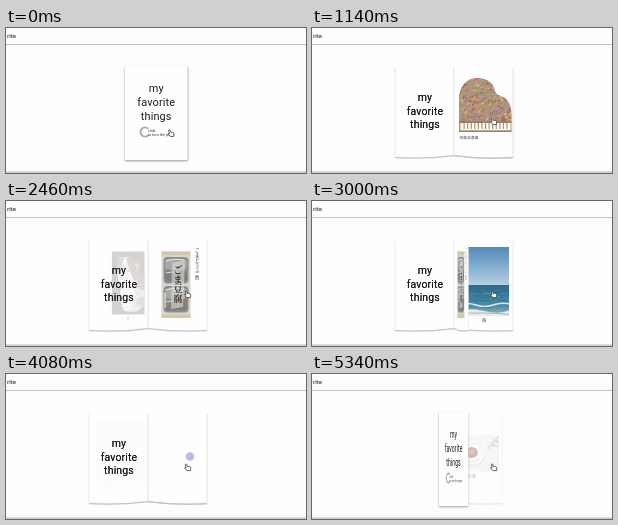
These frames come from a looping animation (300 px wide and 145 px high, 5.4 s). An HTML page with a canvas:

```html
<!DOCTYPE html>
<html lang="ja">
<head>
<meta charset="utf-8">
<title>my favorite things</title>
<style>
html, body { margin: 0; width: 100%; height: 100%; overflow: hidden; background: #fdfdfd; }
canvas { display: block; width: 300px; height: 145px; }
</style>
</head>
<body>
<canvas id="stage"></canvas>
<script>
const LOOP = 5400, STEP = 60;
const OPEN = 240, OPEN_MS = 900, FLIP = 1095, GAP = 740, FLIP_MS = 950, CLOSE = 4765;
const SPINE = 142, PAGE = 59, TOP = 40;
const JP = '"Noto Sans CJK JP", "Noto Sans CJK", sans-serif';
const SERIF = '"Noto Serif CJK JP", "Noto Sans CJK JP", "Noto Sans CJK", serif';

const canvas = document.getElementById('stage');
const g = canvas.getContext('2d');
const dpr = window.devicePixelRatio || 1;
canvas.width = 300 * dpr;
canvas.height = 145 * dpr;
const layer = document.createElement('canvas');
layer.width = canvas.width;
layer.height = canvas.height;

const clamp = v => Math.max(0, Math.min(1, v));
const ease = v => { v = clamp(v); return v * v * (3 - 2 * v); };

function random(seed) {
  return () => (seed = (seed * 16807) % 2147483647) / 2147483647;
}
function rect(x, y, w, h, fill) {
  g.fillStyle = fill;
  g.fillRect(x, y, w, h);
}
function round(x, y, w, h, r, fill) {
  g.fillStyle = fill;
  g.beginPath();
  g.roundRect(x, y, w, h, r);
  g.fill();
}
function oval(x, y, rx, ry, fill, turn = 0) {
  g.fillStyle = fill;
  g.beginPath();
  g.ellipse(x, y, rx, ry, turn, 0, 7);
  g.fill();
}
function shape(d, fill) {
  g.fillStyle = fill;
  g.fill(new Path2D(d));
}
function line(d, color, width) {
  g.strokeStyle = color;
  g.lineWidth = width;
  g.stroke(new Path2D(d));
}
function label(text, x, y, font, color = '#333', align = 'center') {
  g.font = font;
  g.fillStyle = color;
  g.textAlign = align;
  g.fillText(text, x, y);
}
function column(text, x, y, pitch, font, color) {
  [...text].forEach((c, i) => label(c, x, y + i * pitch, font, color));
}
function vertical(stops, y0, y1) {
  const grad = g.createLinearGradient(0, y0, 0, y1);
  stops.forEach((c, i) => grad.addColorStop(i / (stops.length - 1), c));
  return grad;
}
function group(draw) {
  g.save();
  draw();
  g.restore();
}
function clipBox(x, y, w, h) {
  g.beginPath();
  g.rect(x, y, w, h);
  g.clip();
}

// Page pictures: x is measured from the spine.
function piano() {
  group(() => {
    g.clip(new Path2D('M5 104V72C5 59 12 50 23 50C34 50 40 56 41 63C42 68 48 67 52 71C57 76 58 83 57.5 94V104Z'));
    rect(4, 49, 54, 56, '#b09577');
    const rnd = random(77);
    const paints = ['#d0b24a', '#b0607e', '#7f9f5e', '#cf8aa0', '#8a78b0', '#e2c988', '#b5533f', '#7396a0'];
    g.lineCap = 'round';
    for (let i = 0; i < 380; i++) {
      const x = 4 + rnd() * 54, y = 49 + rnd() * 46;
      const a = rnd() * 2 - 1.4, n = 1 + rnd() * 3;
      g.globalAlpha = .75;
      line(`M${x} ${y}l${Math.cos(a) * n} ${Math.sin(a) * n}`, paints[Math.floor(rnd() * 8)], 1.2);
    }
    g.globalAlpha = 1;
    rect(5, 93.5, 53, 1, '#8a6a50');
    rect(6.5, 95, 50, 7.5, '#fbfaf7');
    for (let i = 1; i < 14; i++) rect(6 + i * 3.57, 95, 1.1, 6, '#a58a70');
    rect(5, 102.5, 53, 1.5, '#a08468');
  });
  label('印象派音楽', 5.5, 110.7, '3.8px ' + JP, '#333', 'left');
}

function cat() {
  group(() => {
    clipBox(5, 50.5, 50, 63);
    rect(5, 50, 50, 64, '#292c2a');
    const rnd = random(19);
    for (let i = 0; i < 45; i++)
      oval(5 + rnd() * 50, 50 + rnd() * 64, 1 + rnd() * 2, .6, i % 2 ? '#38423a' : '#342f32', rnd() * 3);
    shape('M5 76C12 68 22 68 30 76L41 86C44 95 41 105 36 110L24 111C14 111 8 107 5 101Z', '#b9b2ae');
    shape('M5 75C11 69 19 70 22 77C20 85 13 90 5 89Z', '#5d4c45');
    shape('M5 97C11 93 17 97 18 103C14 107 8 105 5 103Z', '#7b6d68');
    shape('M23 84C32 86 39 85 42 89C43 98 40 105 34 110L25 108C20 100 20 91 23 84Z', '#dcd7d4');
    shape('M14 74L12 60L22 59C28 55 35 55 39 58L44 54C47 61 47 72 45 79C42 86 34 89 27 87C20 85 15 80 14 74Z', '#d9d2cd');
    shape('M14 75L12 60L22 59C27 56 32 56 33 58L28 69L21 80C17 80 15 78 14 75Z', '#5b463c');
    shape('M37 57L44 54C47 60 47 67 46 73L40 68Z', '#6b5346');
    shape('M14 63L20 63L16 70Z', '#a07c72');
    oval(30, 70, 1.7, 1, '#4c4a3a', .3);
    oval(42, 69, 1.4, .9, '#4c4a3a', -.3);
    oval(39, 76, 1.6, 1.1, '#c48e88');
    line('M39 77c-1 3-4 3-6 2M39 77c1 3 3 2 4 1', '#8b7771', .5);
  });
  label('猫', 30, 119.2, '4px ' + JP);
}

function tofu() {
  rect(13.5, 50.5, 29, 66.5, '#d9d5cd');
  rect(13.5, 50.5, 29, 3.5, '#d3c8ae');
  rect(13.5, 113.5, 29, 3.5, '#d3c8ae');
  for (const y of [56, 85]) {
    round(15.5, y, 25, 26.5, 4, '#8d8f90');
    round(17, y + 2, 22, 10.5, 4, '#a7a9a9');
    round(17, y + 14, 22, 10.5, 4, '#7c7e80');
    line(`M18 ${y + 4}q8-3 18-1M18 ${y + 16}q8-2 15 0`, '#e3e3e1', 1.1);
  }
  shape('M24 62L37 59L35 106L23 108Z', 'rgba(222,221,217,.6)');
  column('ごま豆腐', 30, 72, 9.5, 'bold 9px ' + SERIF, '#2b2b2a');
  rect(16.5, 92, 1.2, 15, '#e8e6e0');
  oval(19.5, 103, 2, 2, '#a98662');
  oval(37.5, 100, 2, 2.6, '#a3775c');
  column('ごまどうふ', 49, 51, 4.9, '4.2px ' + JP, '#333');
  label('他', 49, 77.5, '4.2px ' + JP);
}

function sea() {
  group(() => {
    clipBox(4, 46, 51, 69);
    rect(4, 46, 51, 39, vertical(['#5688b9', '#84adcf', '#b7d2e3'], 46, 85));
    rect(4, 84, 51, 31, vertical(['#2e6789', '#36799a', '#4b8ba2', '#9dbdc4'], 84, 115));
    const rnd = random(31);
    for (let i = 0; i < 35; i++) {
      const y = 86 + rnd() * 22;
      rect(4 + rnd() * 46, y, 3 + rnd() * 7, .5, i % 2 ? '#5d98ad' : '#28627f');
    }
    line('M4 104q9-3 18 0t17 0t17-1', '#dce9e9', 1.5);
    shape('M4 111Q16 106 30 110T56 109V115H4Z', '#e6eceb');
    line('M4 113.5q18-3 51 0', '#b9b1a2', 1.2);
  });
  label('海', 30, 121, '4px ' + JP);
}

function dot() {
  oval(42, 82.5, 4.2, 4.2, '#c1b7ea');
}

function tea() {
  group(() => {
    clipBox(3.5, 61, 52, 36.5);
    rect(3, 61, 53, 37, '#e8eaeb');
    line('M3 73q12-4 22-12M3 92q17 0 22 6M39 98q4-8 17-10', '#dadddf', 1.5);
    line('M10 61q5 9-7 17M35 61q5 4 5 13', '#f4f5f5', 2);
    oval(28.7, 82.8, 12.5, 10, '#cbd0d4');
    oval(28, 81, 12, 10, '#f9f9f8');
    oval(28, 81, 9.5, 8, '#dedfdf');
    oval(28, 79, 8, 7.5, '#ffffff');
    oval(28, 78.5, 6.3, 5.6, '#803a26');
    oval(27, 77.5, 4.2, 3, '#a4583a');
    line('M36 79q5-1 4 3q-2 2-5 0', '#ffffff', 1.2);
    line('M15 85l14 7', '#aeb3b6', .9);
    line('M55 63q-6 3-9 10M52 73l4-2', '#82967b', .7);
    for (let i = 0; i < 6; i++)
      oval(46 + i * 1.7 + (i % 2) * 2, 73 - i * 1.9, 2.6, 1.2, i % 2 ? '#8ba486' : '#aabda3', i % 2 ? .4 : -1);
    oval(8, 92, 2.4, 1, '#b4c3ad', .6);
  });
  label('紅茶', 28.5, 104, '4px ' + JP);
}

const pages = [piano, cat, tofu, sea, dot, tea];

function title(x, y, size, pitch) {
  g.letterSpacing = '.15px';
  ['my', 'favorite', 'things'].forEach((w, i) =>
    label(w, x, y + i * pitch, `${size}px Roboto, sans-serif`, '#1c1c1c'));
  g.letterSpacing = '0px';
}
const innerTitle = () => title(-29, 72.8, 10.5, 13.7);

function paper(width) {
  shape(`M0 ${TOP}H${width}V129.5Q${width / 2} 131 0 127.3Z`, '#fefefe');
  line(`M0 127.6Q${width / 2} 131.3 ${width} 129.7`, '#c3c3c3', 1.3);
  line(`M0 ${TOP}V127.5M${width} ${TOP}V129.5`, '#e0e0e0', .7);
}

function leaf(x, scale, alpha, draw) {
  group(() => {
    g.globalAlpha = alpha;
    g.translate(x, 0);
    g.scale(scale, 1);
    draw();
  });
}

// Draws over the stage, then blends what was there before back in.
function fade(alpha, draw) {
  const view = layer.getContext('2d');
  view.clearRect(0, 0, layer.width, layer.height);
  view.drawImage(canvas, 0, 0);
  draw();
  group(() => {
    g.globalAlpha = 1 - alpha;
    g.setTransform(1, 0, 0, 1, 0, 0);
    g.drawImage(layer, 0, 0);
  });
}

function cover() {
  group(() => {
    g.shadowColor = 'rgba(0,0,0,.4)';
    g.shadowBlur = 2 * dpr;
    g.shadowOffsetY = dpr;
    rect(0, 38, 62.5, 94, '#fefefe');
  });
  title(31.2, 63.8, 10.9, 14.3);
  g.lineCap = 'butt';
  g.strokeStyle = '#aaa';
  g.lineWidth = 2;
  g.beginPath();
  g.arc(20, 104, 4.5, .8, 5.5);
  g.stroke();
  label('click', 22.8, 103.6, '3.8px Roboto, sans-serif', '#333', 'left');
  label('to turn the page', 22.8, 107.8, '3.8px Roboto, sans-serif', '#333', 'left');
}

function inside() {
  group(() => {
    g.scale(-1, 1);
    paper(PAGE);
  });
  innerTitle();
}

// Partly opened book: 0 is shut, 1 is flat.
function hinge(open, picture) {
  const x = 119 + (SPINE - 119) * open;
  const turn = Math.cos(Math.PI * open);
  if (open > 0)
    fade(open, () => leaf(x + 7 * (1 - open), 1, 1, () => { paper(PAGE); picture(); }));
  if (turn > 0) leaf(x, turn, 1, cover);
  else leaf(x, -turn, 1, inside);
}

function spread(t) {
  const begun = Math.max(0, Math.min(5, Math.floor((t - FLIP) / GAP) + 1));
  leaf(SPINE, 1, 1, () => { paper(PAGE); pages[begun](); });
  leaf(SPINE, 1, 1, inside);
  for (let i = begun - 1; i >= 0; i--) {
    const p = ease((t - FLIP - i * GAP) / FLIP_MS);
    if (p === 1) continue;
    const turning = () => leaf(SPINE, Math.cos(Math.PI * p), 1, () => { paper(PAGE); pages[i](); });
    // Past upright, the leaf dissolves as it settles on the left.
    if (p <= .5) turning();
    else fade((2 - 2 * p) ** 2.6, turning);
  }
  leaf(SPINE, 1, 1, innerTitle);
}

function hand(t) {
  const p = ease((t - OPEN) / 540);
  const press = t >= 60 && t < OPEN ? .4 : 0;
  group(() => {
    g.translate(165 + 16.7 * p, 105.3 - 11.8 * p + press);
    g.lineJoin = 'round';
    const d = 'M-2.4-3.2q.7-.8 1.3 0l.9 2.1l2.2.2q1.1.4 1 1.7l-.2 2.3h-3.4l-2.3-2.2q-.4-1 .6-.8l.8.3z';
    shape(d, '#fff');
    line(d, '#333', .75);
  });
}

function draw(t) {
  g.setTransform(dpr, 0, 0, dpr, 0, 0);
  rect(0, 0, 300, 145, '#fdfdfd');
  if (t < OPEN + OPEN_MS) hinge(ease((t - OPEN) / OPEN_MS), piano);
  else if (t < CLOSE) spread(t);
  else hinge(1 - ease((t - CLOSE) / FLIP_MS), tea);
  label('rite', 10, 10.2, 'bold 6px Roboto, sans-serif', '#555', 'right');
  rect(0, 16, 300, 1, '#c4c4c4');
  rect(0, 143.5, 300, 1.2, '#b9b9b9');
  hand(t);
}

const start = performance.now();
function tick(now) {
  const t = Math.max(0, now - start) % LOOP;
  draw(Math.floor(t / STEP) * STEP);
  requestAnimationFrame(tick);
}
draw(0);
requestAnimationFrame(tick);
</script>
</body>
</html>
```
